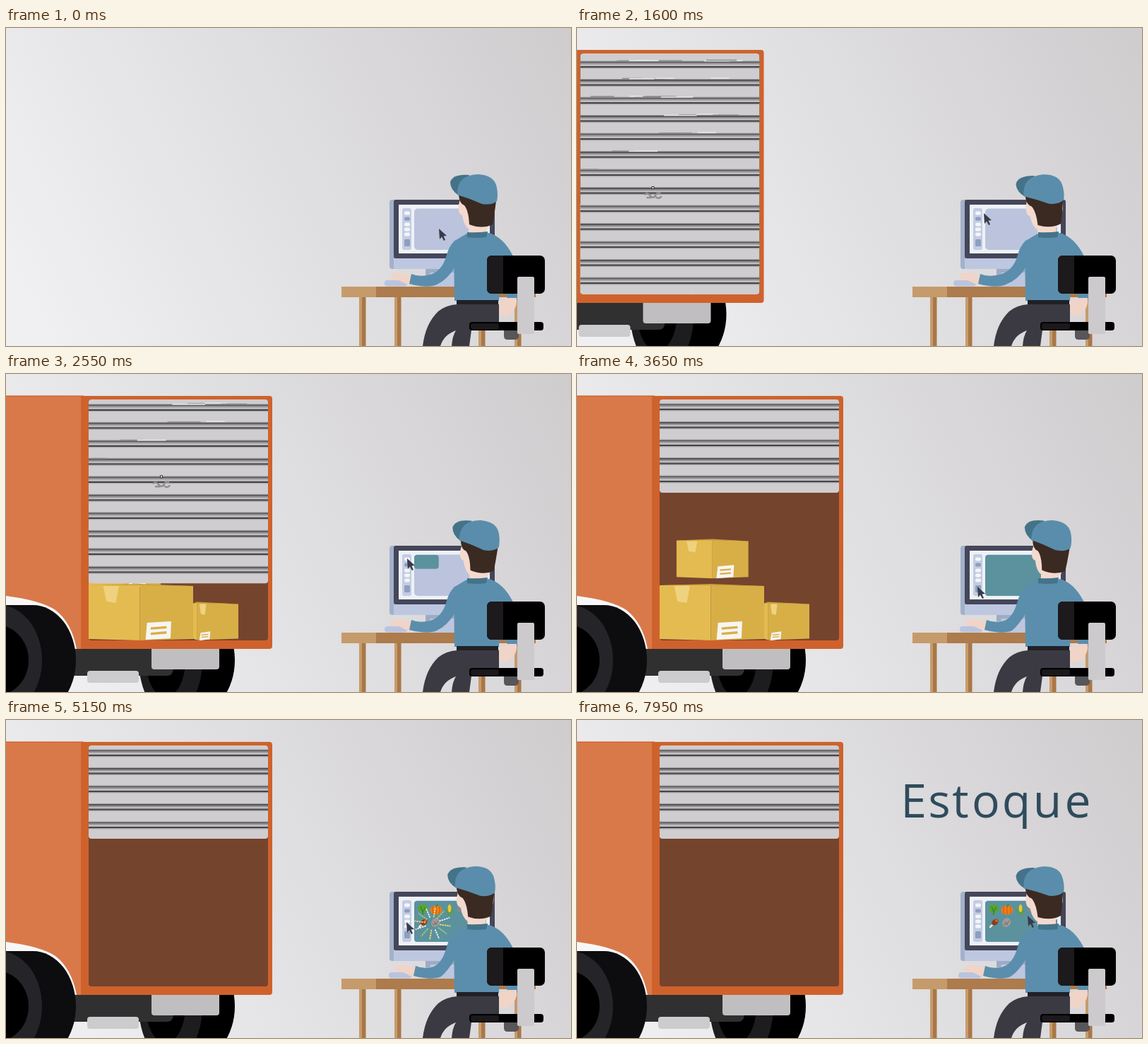
Recreate the animation shown at these times as an HTML page. Size 800x450 px, loop 8 s.

```html
<!DOCTYPE html>
<html lang="pt">
<head>
<meta charset="utf-8">
<title>Estoque</title>
<style>
html, body { margin: 0; width: 100%; height: 100%; overflow: hidden; background: #dfdee0; }
svg { display: block; width: 100%; height: 100%; }
#word text { font: 66px "Open Sans", "Noto Sans", sans-serif; fill: #2f4b5c; text-anchor: middle; }
</style>
</head>
<body>
<svg viewBox="0 0 800 450">
  <defs>
    <linearGradient id="bg" gradientUnits="userSpaceOnUse" x1="0" y1="330" x2="760" y2="-75">
      <stop offset="0" stop-color="#f0f0f2"/>
      <stop offset=".5" stop-color="#dfdee0"/>
      <stop offset="1" stop-color="#cfccce"/>
    </linearGradient>
    <clipPath id="opening"><rect x="117" y="36" width="254" height="341" rx="4"/></clipPath>
  </defs>
  <rect width="800" height="450" fill="url(#bg)"/>

  <g id="desk">
    <g id="legs"></g>
    <path fill="#ad7b4c" d="M524 366H750V381H524Z"/>
    <path fill="#c69b6b" d="M475 366H524V381H475Z"/>
  </g>

  <g id="monitor">
    <path fill="#9eabc5" d="M594 341H650V350H594Z"/>
    <path fill="#bcc6df" d="M601 346H660V366H596Z"/>
    <rect x="543" y="243" width="20" height="98" rx="4" fill="#a3b1ca"/>
    <path fill="#bdc7e0" d="M549 326H692V337Q692 341 688 341H549Z"/>
    <rect x="549" y="243" width="143" height="83" rx="3" fill="#444659"/>
    <rect x="556" y="250" width="129" height="69" fill="#eef1f7"/>
    <rect x="561" y="255" width="13" height="59" rx="3" fill="#c3cce2"/>
    <g id="tools"></g>
    <rect x="578" y="255.500" width="102" height="58.500" rx="5" fill="#bbc4dc"/>
    <rect id="panel" x="578" y="256" rx="4" fill="#5b929e"/>
    <g id="icons">
      <g>
        <path fill="#55a532" d="M584 264Q587 258 591 262Q596 259 597 265Q599 270 593 272L590 276L588 272Q582 271 584 264Z"/>
        <path stroke="#2f7426" fill="none" d="M587 264L590 271L594 265M590 271V276"/>
      </g>
      <g>
        <ellipse cx="609" cy="269" rx="8.500" ry="6.500" fill="#ef7d18"/>
        <path stroke="#c95b0d" fill="none" d="M605 264Q602 269 605 274M609 263V275M613 264Q616 269 613 274"/>
        <path stroke="#5b812d" stroke-width="2" d="M609 264L611 261"/>
      </g>
      <g>
        <ellipse cx="628" cy="266.500" rx="2.400" ry="5.500" fill="#f2c52e"/>
        <path fill="#5da03a" d="M623.500 264Q625 271 628 274Q631 271 632.500 264Q635 274 628 276Q621 274 623.500 264Z"/>
      </g>
      <g><ellipse cx="643" cy="268" rx="5" ry="4" fill="#7e8b98"/></g>
      <g>
        <path stroke="#efe3cf" stroke-width="2.500" stroke-linecap="round" d="M585 293L590 288"/>
        <ellipse cx="592" cy="286" rx="5.500" ry="3.800" transform="rotate(-40 592 286)" fill="#8c3b1f"/>
        <circle cx="594" cy="284" r="2" fill="#c5683c"/>
      </g>
      <g>
        <path fill="#a09a96" d="M602 289Q602 281 609 280Q615 281 614 288Q610 295 604 292Z"/>
        <path stroke="#6c6765" fill="none" d="M604 289Q609 290 612 284M606 285L610 290"/>
      </g>
    </g>
    <g id="burst" fill="none" stroke-width="1.800" stroke-dasharray="2.500 1"></g>
    <path id="cursor" fill="#393b4b" d="M0 0L1 15L4 11.500L7 17L9 16L6.500 10.500L11 10Z"/>
  </g>

  <g id="truck">
    <rect x="188" y="327" width="136" height="156" rx="61" ry="78" fill="#000"/>
    <ellipse cx="233" cy="405" rx="45" ry="78" fill="#1d1c1f"/>
    <ellipse cx="226" cy="405" rx="28" ry="52" fill="#000"/>
    <path fill="#303031" d="M90 388H237V417Q237 427 227 427H90Z"/>
    <rect x="115" y="420" width="73" height="17" rx="4" fill="#cccbcd"/>
    <path fill="#c0bec0" d="M206 388H302V414Q302 418 298 418H210Q206 418 206 414Z"/>
    <path fill="#f7f7f8" d="M-300 312H30Q95 325 100 389H-300Z"/>
    <path fill="#d9794a" d="M-300 31H107V389H100Q93 352 70 334Q48 320 0 314H-300Z"/>
    <path fill="#cf622c" d="M-300 30.500H110V32H-300ZM106 31H373Q377 31 377 35V385Q377 389 373 389H106Z"/>
    <rect x="-71" y="327" width="170" height="156" rx="61" ry="78" fill="#0d0c0e"/>
    <ellipse cx="-10" cy="405" rx="61" ry="78" fill="#252428"/>
    <ellipse cx="-14" cy="405" rx="46" ry="50" fill="#000"/>
    <rect x="117" y="36" width="254" height="341" rx="4" fill="#75442d"/>
    <g id="boxes"></g>
    <g clip-path="url(#opening)"><g id="door"></g></g>
  </g>

  <g id="person">
    <path fill="#5b8eac" d="M684 290Q704 296 717 321L728 345L725 386H711L698 345Z"/>
    <path fill="#f0d4c8" d="M699 386L711 382H723Q724 392 719 399Q712 409 704 408Q697 406 698 398Z"/>
    <path fill="#3b3a42" d="M639 391H698V416L660 420L656 450H631Q632 436 637 428Q620 434 615 450H590Q594 418 612 401Q623 392 639 391Z"/>
    <g id="mouse">
      <rect x="536" y="357" width="32" height="8.500" rx="4" fill="#bac4de"/>
      <path fill="#f0d4c8" d="M545 349Q549 346 560 347L575 350V362H566Q556 355 545 356Z"/>
    </g>
    <path id="sleeve" fill="#5b8eac"/>
    <path fill="#5b8eac" d="M634 302Q645 295 656 289H680Q696 293 701 303L698 386H635Z"/>
    <path fill="#202026" d="M638 385H697V391H638Z"/>
    <g id="head">
      <path fill="#f4d9cf" d="M655 276H681V290H655Z"/>
      <path fill="#f4d9cf" d="M643 242L641 250Q639 262 646 265Q648 280 656 285Q670 290 683 283L689 264Q694 262 693 249Z"/>
      <path fill="#3a2a22" d="M641 236L694 244Q692 262 689 278Q674 285 656 278Q655 258 649 251Q642 249 641 236Z"/>
      <path fill="#447389" d="M656 208Q633 206 629 218Q629 229 641 237L650 220Z"/>
      <path fill="#5a8dab" d="M639 236Q638 208 668 207Q692 208 695 226Q697 237 695 245Q688 251 674 249Q656 241 639 236Z"/>
    </g>
    <path fill="#447389" d="M653 289Q667 290 682 288L680 296Q667 298 653 296Z"/>
  </g>

  <g id="chair">
    <path fill="#57565a" d="M705 428H726V436Q726 441 720 441H710Q705 441 705 436Z"/>
    <rect x="656" y="416" width="105" height="12" rx="4" fill="#000"/>
    <rect x="658" y="418" width="40" height="8" rx="3" fill="#1b191b"/>
    <rect x="681" y="322" width="82" height="54" rx="7" fill="#000"/>
    <path fill="#1c1a1c" d="M688 322H704V376H688Q681 376 681 369V329Q681 322 688 322Z"/>
    <rect x="724" y="352" width="24" height="81" rx="2" fill="#cccacc"/>
  </g>
  <g id="word"></g>
</svg>

<script>
const LOOP = 8000;
const $ = id => document.getElementById(id);
const clamp = v => Math.max(0, Math.min(1, v));
const span = (t, from, dur) => clamp((t - from) / dur);
const smooth = u => u * u * (3 - 2 * u);
const inOut = u => u < .5 ? 2 * u * u : 1 - 2 * (1 - u) ** 2;
const rect = (x, y, w, h, fill, rx = 0) =>
  `<rect x="${x}" y="${y}" width="${w}" height="${h}" fill="${fill}" rx="${rx}"/>`;

// Eased value between [time, value] keys
function track(keys, t) {
  for (let i = 1; i < keys.length; i++) {
    const [a, v] = keys[i - 1], [b, w] = keys[i];
    if (t <= b) return v + (w - v) * smooth(span(t, a, b - a));
  }
  return keys[keys.length - 1][1];
}

let seed = 7;
const rnd = () => (seed = seed * 16807 % 2147483647) / 2147483647;

$('legs').innerHTML = [500, 550, 669, 720].map(x =>
  rect(x, 380, 4, 70, '#c69b6b') + rect(x + 4, 380, 5.5, 70, '#a97747')).join('');

$('tools').innerHTML = [262, 270, 278, 285, 292].map((y, i) =>
  rect(564, y - 2.5, 8, 5, i === 1 ? '#8c9fc0' : '#f3f5fa', 2.2)).join('') + rect(564, 299, 8, 10, '#8c9fc0', 1.5);

// Roller door, drawn closed; each joint is a pale bar between two dark lines
let door = rect(117, 36, 254, 341, '#cfcdcf', 4);
for (let i = 0; i < 13; i++) {
  const y = 357.5 - 25.5 * i;
  door += rect(117, y - 5, 254, 1, '#a09fa1') + rect(117, y - 4, 254, 2, '#565557') +
    rect(117, y - 2, 254, 2, '#8f8e90') + rect(117, y, 254, 2.5, '#bdbcbe') +
    rect(117, y + 2.5, 254, 2.3, '#454446') + rect(117, y + 4.8, 254, 1, '#a09fa1');
  for (let k = 5; k < i; k++)
    door += rect(120 + rnd() * 200, y - 7 + rnd() * 2, 12 + rnd() * 38, 1.6, k % 2 ? '#8d8c8e' : '#e8e7e9');
}
door += '<path fill="none" stroke="#8f8e90" stroke-width="2.500" d="M208 236Q212 232 216 237Q221 243 224 236Q228 231 231 235M211 240H218M224 239Q229 243 232 238"/>' +
  rect(218, 224, 4, 4, '#333') + rect(219, 225, 2, 2, '#eee');
$('door').innerHTML = door;

// Carton centred on the origin
function carton(w, h, split) {
  const l = -w / 2, r = w / 2, t = -h / 2, b = h / 2, s = l + w * split;
  const lw = w * .245, lx = s + w * .055, ly = b - lw * .72, lh = lw * .64;
  const line = f => `M${lx + lw * .2} ${ly + lh * f}L${lx + lw * .82} ${ly + lh * (f - .08)}`;
  return `<path fill="#e4bb51" d="M${l} ${t + 1}L${s} ${t}V${b}L${l} ${b - 2}Z"/>
    <path fill="#d8af47" d="M${s} ${t}L${r} ${t + 2}V${b - 2}L${s} ${b}Z"/>
    <path fill="#c99f3b" d="M${l} ${t + 1}L${s} ${t - 1}L${r} ${t + 2}L${s} ${t + 1}Z"/>
    <path fill="#efd27f" d="M${l + w * .14} ${t + 2}H${l + w * .29}L${l + w * .26} ${t + h * .33}L${l + w * .17} ${t + h * .3}Z"/>
    <path fill="#f6f5f3" d="M${lx + 2} ${ly + 1}L${lx + lw} ${ly - 1}L${lx + lw - 1} ${ly + lh}L${lx} ${ly + lh + 2}Z"/>
    <path fill="none" stroke="#d8af47" stroke-width="${lw / 11}" d="${line(.4)}${line(.72)}"/>`;
}
const boxes = [
  { x: 297, y: 350, w: 64, h: 53, split: .08, start: 4280, peak: 150 },
  { x: 168, y: 275, w: 102, h: 55, split: .5, start: 3520, peak: 145 },
  { x: 191, y: 337.5, w: 148, h: 79, split: .49, start: 3900, peak: 150 }
];
$('boxes').innerHTML = boxes.map(b => `<g>${carton(b.w, b.h, b.split)}</g>`).join('');
boxes.forEach((b, i) => b.el = $('boxes').children[i]);

const RAYS = 12;
$('burst').innerHTML = Array.from({ length: RAYS }, (_, i) =>
  `<line stroke="${['#f1dc6a', '#9bd07c', '#f6f4e4'][i % 3]}"/>`).join('');

const letters = [...'Estoque'];
const letterX = [476.5, 513, 543, 579, 622, 666, 709];
$('word').innerHTML = letters.map(c => `<text>${c}</text>`).join('');

const headKeys = [[0, 0], [1600, -7], [2550, 3], [3300, 5], [3650, 4.5], [5150, -3.5], [6900, -2], [7950, -7]];
const handKeys = [[0, 0], [1600, -3], [2550, 0], [3650, 6], [5150, 6], [6900, -4], [7950, 4]];
const cursorX = [[0, 613], [1300, 576], [1700, 576], [2300, 568], [3500, 567], [5300, 567], [6500, 609], [7000, 609], [7800, 638]];
const cursorY = [[0, 284], [1300, 262], [2700, 261], [3500, 301], [4000, 301], [4800, 286], [5300, 286], [6500, 267], [7000, 267], [7800, 277]];

function draw(t) {
  $('truck').setAttribute('transform', `translate(${-390 * (1 - span(t, 0, 2250))} 0)`);
  $('door').setAttribute('transform', `translate(0 ${-209 * span(t, 2250, 780)})`);

  for (const b of boxes) {
    const s = inOut(span(t, b.start, 800)), q = 1 - s;
    const x = q * q * b.x + 2 * q * s * 390 + s * s * 610;
    const y = q * q * b.y + 2 * q * s * b.peak + s * s * 285;
    b.el.setAttribute('transform', `translate(${x} ${y}) scale(${1 - .9 * s * s})`);
    b.el.setAttribute('display', s < 1 ? 'inline' : 'none');
  }

  const grow = span(t, 2350, 590);
  $('panel').setAttribute('width', 102 * grow);
  $('panel').setAttribute('height', 58 * grow);

  [...$('icons').children].forEach((icon, i) => {
    const s = smooth(span(t, 4320 + i * 110, 180));
    const x = i < 4 ? 590 + i * 18.5 : 591 + (i - 4) * 17, y = i < 4 ? 268 : 287;
    icon.setAttribute('transform', `translate(${x} ${y}) scale(${s}) translate(${-x} ${-y})`);
  });

  const p = span(t, 4900, 600);
  $('burst').setAttribute('display', p > 0 && p < 1 ? 'inline' : 'none');
  const inner = 24 * p, outer = 27 * Math.sqrt(clamp(p * 2.2));
  [...$('burst').children].forEach((ray, i) => {
    const a = (i + .3) * 2 * Math.PI / RAYS, c = Math.cos(a), s = Math.sin(a);
    const set = (k, r) => {
      ray.setAttribute('x' + k, 604 + c * r);
      ray.setAttribute('y' + k, 288 + s * r * .9);
    };
    set(1, inner);
    set(2, Math.max(inner, outer));
  });

  $('cursor').setAttribute('transform', `translate(${track(cursorX, t)} ${track(cursorY, t)})`);

  const hand = track(handKeys, t), cuff = 573 + hand;
  $('mouse').setAttribute('transform', `translate(${hand} 0)`);
  $('sleeve').setAttribute('d', `M636 300Q627 309 624 321Q617 347 ${cuff + 23} 350Q${cuff + 10} 352 ${cuff + 1} 348L${cuff - 2} 362Q${cuff + 24} 369 ${cuff + 37} 363Q624 357 636 338Z`);

  $('head').setAttribute('transform', `rotate(${track(headKeys, t) * .56} 668 330)`);

  [...$('word').children].forEach((el, i) => {
    const left = Math.max(0, 6975 + i * 50 - t);
    el.setAttribute('x', letterX[i]);
    el.setAttribute('y', 138 - .56 * left);
  });
}

const begin = performance.now();
function tick() {
  draw((performance.now() - begin) % LOOP);
  requestAnimationFrame(tick);
}
draw(0);
requestAnimationFrame(tick);
</script>
</body>
</html>
```
